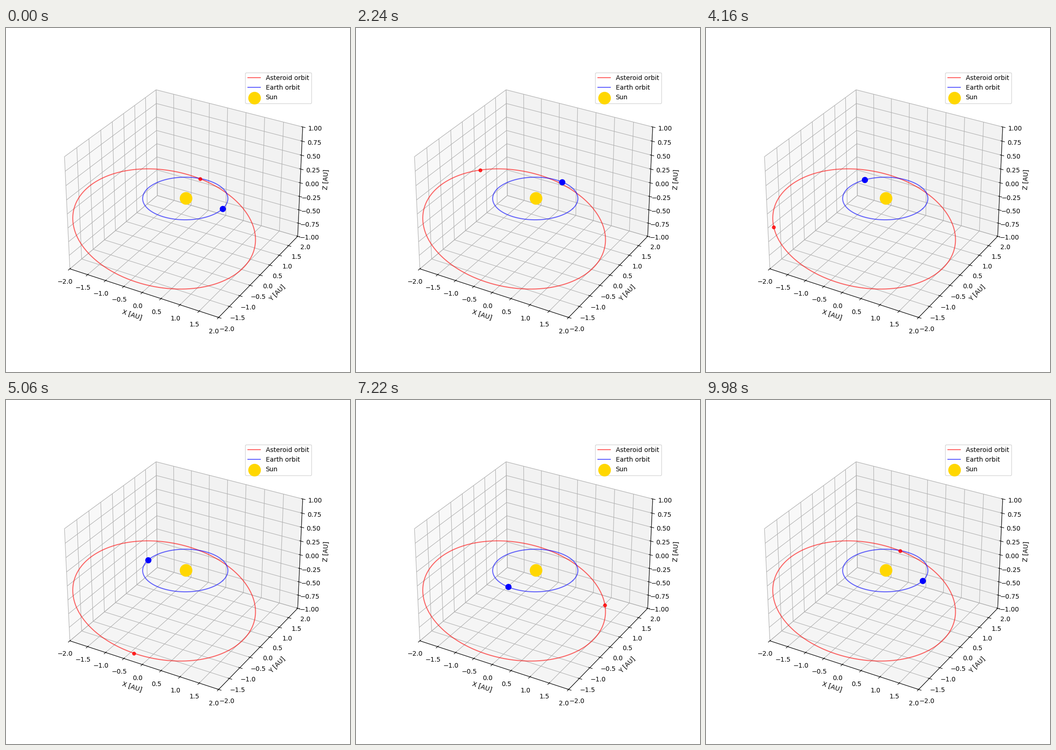
Write a matplotlib script that moves like this. It is 748 px wide and 748 px high and loops after 10000 ms.

```python
import numpy as np
import matplotlib.pyplot as plt
from matplotlib.animation import FuncAnimation
from mpl_toolkits.mplot3d import proj3d

SIZE, DPI = 748, 100
FRAMES, INTERVAL = 500, 20


def orbit(a, e, incl=0.0, node=0.0, peri=0.0):
    """Positions at evenly spaced true anomalies, angles in degrees."""
    nu = np.linspace(0, 2 * np.pi, FRAMES)
    incl, node, peri = np.radians([incl, node, peri])
    r = a * (1 - e**2) / (1 + e * np.cos(nu))
    along = r * np.cos(nu + peri)
    across = r * np.sin(nu + peri)
    x = along * np.cos(node) - across * np.cos(incl) * np.sin(node)
    y = along * np.sin(node) + across * np.cos(incl) * np.cos(node)
    return x, y, across * np.sin(incl)


asteroid = orbit(2.4734, 0.5706, 9.396, 110.42, 350.51)
earth = orbit(1.0, 0.0167)

fig = plt.figure(figsize=(SIZE / DPI, SIZE / DPI), dpi=DPI)


def draw_scene():
    space = fig.add_subplot(projection="3d")
    space.plot(*asteroid, color="red", alpha=0.6, label="Asteroid orbit")
    space.plot(*earth, color="blue", alpha=0.6, label="Earth orbit")
    space.scatter(0, 0, 0, s=350, color="gold", label="Sun")
    space.set(xlim=(-2, 2), ylim=(-2, 2), zlim=(-1, 1),
              xlabel="X [AU]", ylabel="Y [AU]", zlabel="Z [AU]")
    space.legend(loc="upper right")
    fig.canvas.draw()
    return space


def to_pixels(space, path):
    px, py, _ = proj3d.proj_transform(*path, space.get_proj())
    return space.transData.transform(np.column_stack([px, py]))


# The scene is fixed: render it once and move only the two bodies over it.
space = draw_scene()
backdrop = np.asarray(fig.canvas.buffer_rgba()).copy()
asteroid_px = to_pixels(space, asteroid)
earth_px = to_pixels(space, earth)

fig.clear()
ax = fig.add_axes([0, 0, 1, 1])
ax.set_axis_off()
ax.imshow(backdrop, extent=(0, SIZE, 0, SIZE), aspect="auto",
          interpolation="nearest")
ax.set(xlim=(0, SIZE), ylim=(0, SIZE))
asteroid_dot = ax.scatter(*asteroid_px[0], s=25, color="red", alpha=0.8, zorder=3)
earth_dot = ax.scatter(*earth_px[0], s=75, color="blue", zorder=4)


def update(i):
    asteroid_dot.set_offsets(asteroid_px[i])
    earth_dot.set_offsets(earth_px[i])
    return asteroid_dot, earth_dot


anim = FuncAnimation(fig, update, frames=FRAMES, interval=INTERVAL,
                     repeat=True, repeat_delay=0)
plt.show()
```
